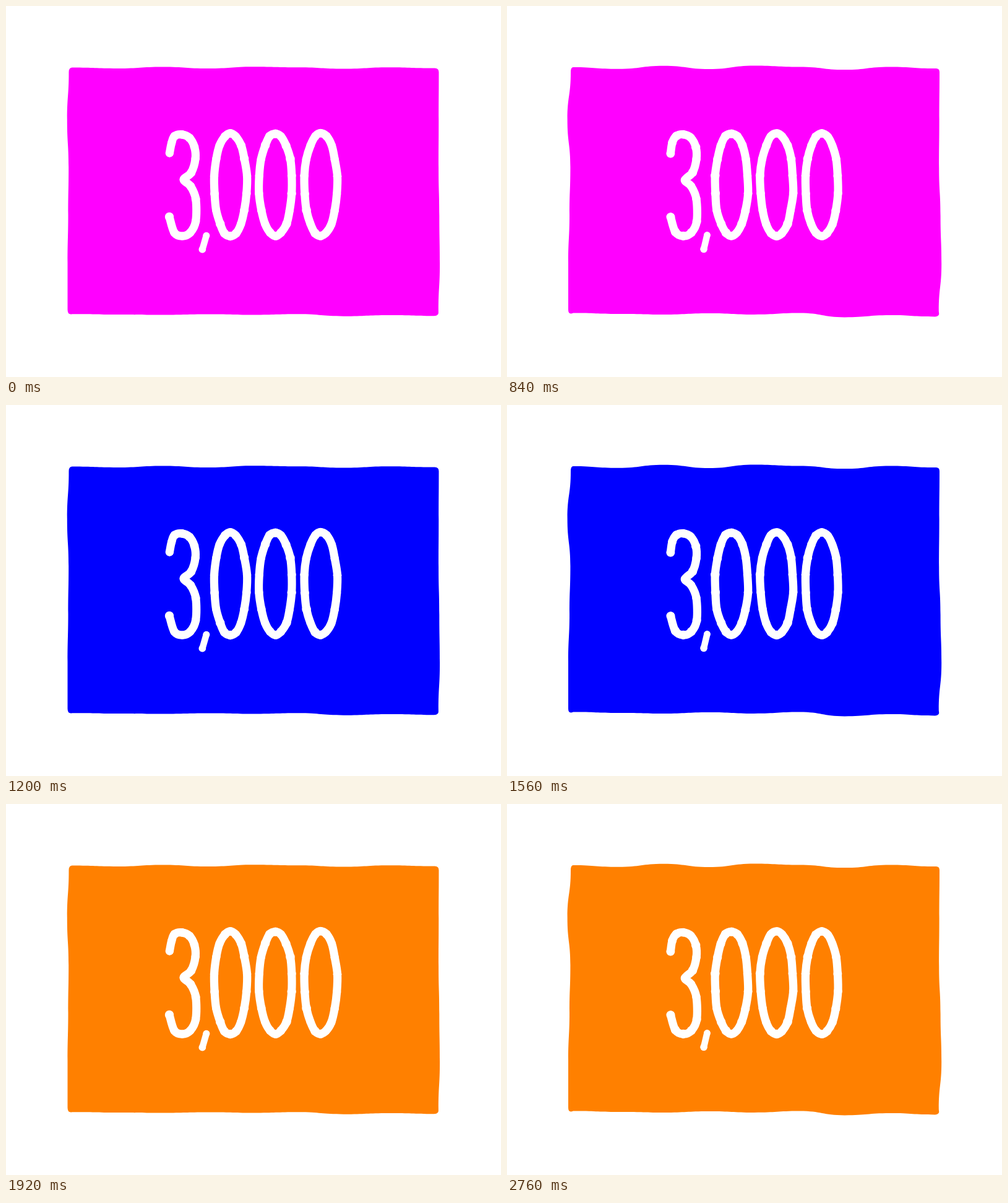
An HTML page with a canvas for the animation above (2.88 s loop, 800 by 600 pixels).

```html
<!DOCTYPE html>
<html lang="en">
<head>
<meta charset="utf-8">
<title>3,000</title>
<style>
html, body { margin: 0; width: 100%; height: 100%; overflow: hidden; background: #fff; }
canvas { display: block; }
</style>
</head>
<body>
<canvas width="800" height="600" aria-label="3,000"></canvas>
<script>
const ctx = document.querySelector('canvas').getContext('2d');
const STEP = 120, LOOP = 2880;
const colors = ['#ff00ff', '#0000ff', '#ff8000'];

// Panel sides, clockwise, with the sway at evenly spaced points.
const sides = [
  { from: [107, 100], to: [692, 100], sway: [-.5, .9, -1.6, 1, -1.8, -.8, 1.5, -.8, .5] },
  { from: [700, 107], to: [700, 494], sway: [-.5, -.7, -.9, .3, 1.1, -1.1] },
  { from: [692, 500], to: [107, 500], sway: [1.2, 0, 1.7, -1.7, -.5, -1.5, -.5, -1, -1.75] },
  { from: [100, 491], to: [100, 107], sway: [-.5, -.5, .5, 1.2, -1.2, 1.5] }
];

const three = [
  [265, 238], [267, 221], [273, 211], [285, 208], [297, 213], [305, 228], [306, 247], [300, 269],
  [288, 281], [298, 291], [306, 312], [306, 348], [298, 366], [285, 372], [272, 366], [264, 341]
];
const comma = [[324, 371], [318, 394]];

function zero(index) {
  const points = 18;
  return Array.from({ length: points }, (_, i) => {
    const angle = i / points * 2 * Math.PI;
    return [362.7 + 73 * index + 26.7 * Math.sin(angle), 289 - 83 * Math.cos(angle)];
  });
}

function seeded(seed) {
  return () => {
    seed = (seed * 16807) % 2147483647;
    return seed / 2147483647;
  };
}

function panel(color, amount) {
  ctx.fillStyle = color;
  ctx.beginPath();
  sides.forEach(({ from: [x0, y0], to: [x1, y1], sway }, s) => {
    const flat = y0 === y1;
    let px, py;
    sway.forEach((d, i) => {
      const t = i / (sway.length - 1);
      const x = x0 + (x1 - x0) * t + (flat ? 0 : d * amount);
      const y = y0 + (y1 - y0) * t + (flat ? d * amount : 0);
      if (i) {
        const mx = (px + x) / 2, my = (py + y) / 2;
        if (flat) ctx.bezierCurveTo(mx, py, mx, y, x, y);
        else ctx.bezierCurveTo(px, my, x, my, x, y);
      } else if (s) {
        ctx.quadraticCurveTo(flat ? x1 < x0 ? 700 : 100 : x, flat ? y : y0 < y1 ? 100 : 500, x, y);
      } else {
        ctx.moveTo(x, y);
      }
      [px, py] = [x, y];
    });
  });
  const startY = 100 + sides[0].sway[0] * amount;
  ctx.quadraticCurveTo(100 + 1.5 * amount, startY, 107, startY);
  ctx.fill();
}

// A smooth, slightly shaky line whose thickness swells at its points.
function pen(points, width, random, closed) {
  const shaky = points.map(p => p.map(v => v + (random() - .5) * 1.4));
  const n = shaky.length;
  const at = i => shaky[closed ? (i + n) % n : Math.max(0, Math.min(n - 1, i))];
  ctx.lineWidth = width;
  ctx.beginPath();
  ctx.moveTo(...shaky[0]);
  for (let i = 0; i < (closed ? n : n - 1); i++) {
    const [a, b, c, d] = [at(i - 1), at(i), at(i + 1), at(i + 2)];
    ctx.bezierCurveTo(
      b[0] + (c[0] - a[0]) / 6, b[1] + (c[1] - a[1]) / 6,
      c[0] - (d[0] - b[0]) / 6, c[1] - (d[1] - b[1]) / 6,
      c[0], c[1]);
  }
  ctx.stroke();
  for (const [x, y] of shaky) {
    ctx.beginPath();
    ctx.arc(x, y, width / 2 + random() * .7, 0, 2 * Math.PI);
    ctx.fill();
  }
}

function lettering(seed) {
  const random = seeded(seed);
  ctx.strokeStyle = ctx.fillStyle = '#fff';
  ctx.lineCap = ctx.lineJoin = 'round';
  pen(three, 13.2, random);
  pen(comma, 10.5, random);
  for (let i = 0; i < 3; i++) pen(zero(i), 13.2, random, true);
}

function draw() {
  const step = Math.floor(performance.now() % LOOP / STEP);
  const pose = step % 2;
  ctx.clearRect(0, 0, 800, 600);
  panel(colors[Math.floor(step / 8)], 1 + pose);
  lettering(4321 + 1000 * pose);
  requestAnimationFrame(draw);
}
draw();
</script>
</body>
</html>
```
